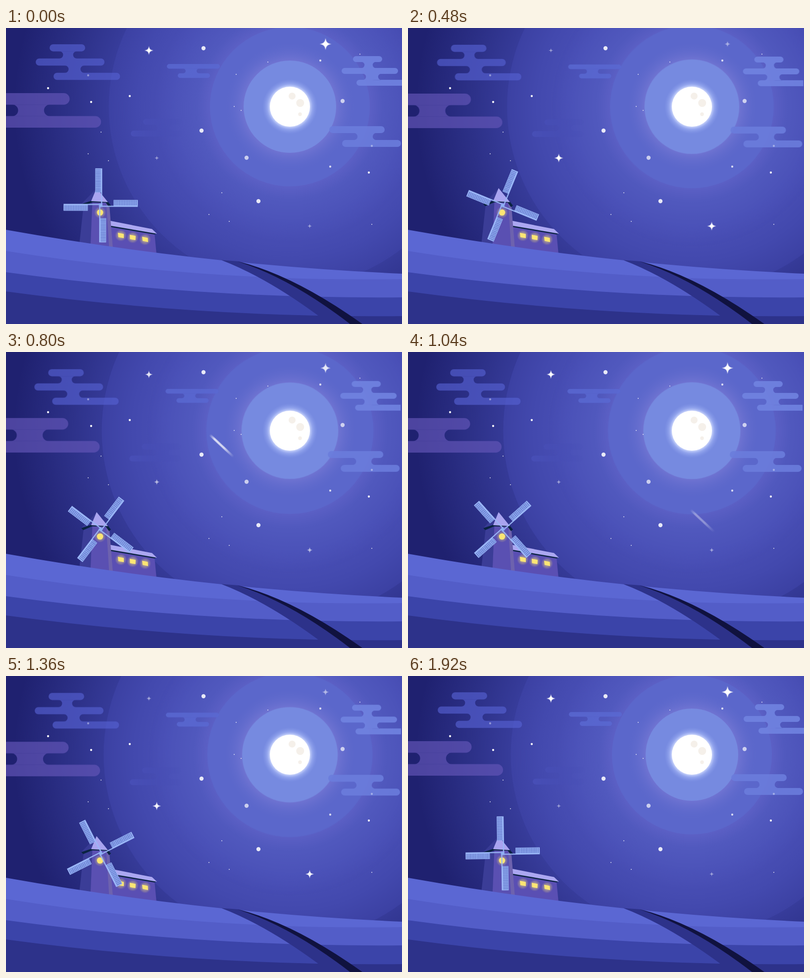
Animation of 800x600 px, one loop 1960 ms. Source, as an HTML page without scripts:

```html
<!DOCTYPE html>
<html lang="en">
<head>
<meta charset="utf-8">
<title>Windmill at night</title>
<style>
html, body { margin: 0; width: 100%; height: 100%; overflow: hidden; background: #1f2170; }
svg { display: block; width: 100%; height: 100%; }

.halo, .ring { transform-origin: 573.5px 159.5px; animation: grow 980ms cubic-bezier(.37, 0, .63, 1) infinite alternate; }
.halo { --s: 1.05; }
.ring { --s: 1.042; }
@keyframes grow { to { transform: scale(var(--s)); } }

.clouds { animation: drift 980ms cubic-bezier(.37, 0, .63, 1) infinite alternate; }
@keyframes drift { to { transform: translate(-3px, 1.9px); } }
.clouds path { stroke-linecap: round; }
.clouds .neck { stroke: none; }
.clouds .bar { fill: none; }

.spark { animation: twinkle 490ms cubic-bezier(.37, 0, .63, 1) infinite alternate; }
.late { animation-delay: -490ms; }
@keyframes twinkle { to { transform: scale(.5); opacity: .48; } }

.blades { animation: spin 1960ms linear infinite; }
@keyframes spin { to { transform: rotate(90.9deg); } }

.meteor { animation: fly 1960ms linear infinite; }
@keyframes fly {
  0%, 29.6% { transform: translate(-145px, -139px); opacity: 0; }
  36.7% { opacity: .85; }
  40.82% { transform: translate(0, 0); opacity: .85; }
  53.06% { transform: translate(159px, 152px); opacity: .4; }
  59.2%, 100% { transform: translate(238px, 228px); opacity: 0; }
}
</style>
</head>
<body>
<svg viewBox="0 0 800 600" preserveAspectRatio="none">
  <defs>
    <radialGradient id="sky" gradientUnits="userSpaceOnUse" cx="573.5" cy="159.5" r="600">
      <stop offset=".6" stop-color="#383d9c"/>
      <stop offset=".75" stop-color="#2c3087"/>
      <stop offset=".93" stop-color="#1f2170"/>
    </radialGradient>
    <radialGradient id="outer">
      <stop offset=".68" stop-color="#494fb5"/>
      <stop offset=".84" stop-color="#4349ae"/>
      <stop offset="1" stop-color="#3c41a3"/>
    </radialGradient>
    <radialGradient id="glow">
      <stop offset=".58" stop-color="#5c60c5"/>
      <stop offset=".68" stop-color="#5159be"/>
      <stop offset=".84" stop-color="#4c53b9"/>
      <stop offset="1" stop-color="#494fb5" stop-opacity="0"/>
    </radialGradient>
    <radialGradient id="haze">
      <stop offset=".7" stop-color="#7074d2"/>
      <stop offset="1" stop-color="#5c68cb" stop-opacity="0"/>
    </radialGradient>
    <radialGradient id="shine">
      <stop offset=".7" stop-color="#dfe6ff" stop-opacity=".95"/>
      <stop offset=".82" stop-color="#b0c0fa" stop-opacity=".5"/>
      <stop offset="1" stop-color="#8ea0ee" stop-opacity="0"/>
    </radialGradient>
    <radialGradient id="lamp">
      <stop offset=".35" stop-color="#fbe574" stop-opacity=".5"/>
      <stop offset="1" stop-color="#fbe574" stop-opacity="0"/>
    </radialGradient>
    <linearGradient id="fade" gradientUnits="userSpaceOnUse" x1="252" x2="360" y1="0" y2="0">
      <stop offset="0" stop-color="#484fb6"/>
      <stop offset="1" stop-color="#484fb6" stop-opacity="0"/>
    </linearGradient>
    <linearGradient id="tail">
      <stop offset="0" stop-color="#fff" stop-opacity="0"/>
      <stop offset=".2" stop-color="#fff" stop-opacity=".9"/>
      <stop offset=".6" stop-color="#fff" stop-opacity=".85"/>
      <stop offset="1" stop-color="#fff" stop-opacity="0"/>
    </linearGradient>
    <path id="star" fill="#fff" d="M0-1C.12-.3 .3-.12 1 0C.3 .12 .12 .3 0 1C-.12 .3-.3 .12-1 0C-.3-.12-.12-.3 0-1Z"/>
    <g id="arm">
      <path fill="#9ab6f7" d="M-11-75H2.5V-26H-11Z"/>
      <path d="M-9-73V-27M-6.4-73V-27M-3.8-73V-27M-1.2-73V-27" stroke="#4a5cb8" stroke-width="1.5" stroke-dasharray="2.1 1.3"/>
      <path fill="#9ab6f7" d="M.8-75H3V0H.8Z"/>
    </g>
  </defs>

  <rect width="800" height="600" fill="url(#sky)"/>
  <circle class="ring" cx="573.5" cy="159.5" r="366" fill="url(#outer)"/>
  <g class="halo">
    <circle cx="573.5" cy="159.5" r="276" fill="url(#glow)"/>
    <circle cx="573.5" cy="159.5" r="161.5" fill="#5b67cb"/>
    <circle cx="573.5" cy="159.5" r="132" fill="url(#haze)"/>
    <circle cx="573.5" cy="159.5" r="93.5" fill="#768ae0"/>
  </g>

  <g class="clouds">
    <g fill="#5660d0" stroke="#5660d0" stroke-width="14.5" opacity=".66">
      <path class="bar" d="M95.3 40.2H152.7M67.3 69H191.7M103.3 98H223.2"/>
      <path class="neck" d="M108 47.2a7.25 7.25 0 0 1 0 14.8H143a7.25 7.25 0 0 1 0-14.8ZM119 76a7.25 7.25 0 0 1 0 15H158a7.25 7.25 0 0 1 0-15Z"/>
    </g>
    <g fill="#6154b6" stroke="#6154b6" stroke-width="23.5" opacity=".7">
      <path class="bar" d="M-40 143.8H116.8M-40 190.3H180.3"/>
      <path class="neck" d="M12.8 155.3a11.7 11.7 0 0 1 0 23.4H88.5a11.7 11.7 0 0 1 0-23.4Z"/>
    </g>
    <g fill="#5b69d2" stroke="#5b69d2" stroke-width="9.4" opacity=".8">
      <path class="bar" d="M329.7 77.7H427.5M351.7 96.5H407.5"/>
      <path class="neck" d="M358 82.2a4.8 4.8 0 0 1 0 9.8H390a4.8 4.8 0 0 1 0-9.8Z"/>
    </g>
    <g fill="url(#fade)" stroke="url(#fade)" stroke-width="12">
      <path class="bar" d="M283 190H350M258 214H350"/>
      <path class="neck" d="M300 196a6 6 0 0 1 0 12H336a6 6 0 0 1 0-12Z"/>
    </g>
    <g fill="#7083e0" stroke="#7083e0" stroke-width="12" opacity=".9">
      <path class="bar" d="M707 63H754M684 87H786M714 111H740"/>
      <path class="neck" d="M718 68.8a6 6 0 0 1 0 12.4H747a6 6 0 0 1 0-12.4ZM721 92.8a6 6 0 0 1 0 12.4H758a6 6 0 0 1 0-12.4ZM730 105H800V117H730Z"/>
    </g>
    <g fill="#6b7ddc" stroke="#6b7ddc" stroke-width="14" opacity=".9">
      <path class="bar" d="M660 206H758M686 234H791"/>
      <path class="neck" d="M703 212.8a7.1 7.1 0 0 1 0 14.4H748a7.1 7.1 0 0 1 0-14.4Z"/>
    </g>
  </g>

  <circle cx="573.5" cy="159.5" r="56" fill="url(#shine)"/>
  <circle cx="573.5" cy="159.5" r="40.5" fill="#fff"/>
  <g fill="#f5f0ea">
    <circle cx="578" cy="138" r="7"/><circle cx="594.3" cy="152" r="8"/><circle cx="594" cy="174.7" r="3.7"/>
  </g>

  <g fill="none" stroke="#fff" stroke-linecap="round">
    <path stroke-width="8.4" opacity=".87" d="M399 41h0M395 208h0M510 351h0"/>
    <path stroke-width="8.4" opacity=".68" d="M486 263h0M680 148h0"/>
    <path stroke-width="4.3" d="M85 122h0M172 150h0M250 138h0M733 293h0" opacity=".95"/>
    <path stroke-width="4.3" d="M635 66h0M655 281h0" opacity=".75"/>
    <path stroke-width="4.3" d="M166 96h0M739 239h0" opacity=".38"/>
    <path stroke-width="2.1" opacity=".75" d="M192 211h0M166 255h0M207 269h0M529 69h0M465 94h0M461 159h0M475 167h0M715 53h0M436 334h0M410 378h0M451 392h0M739 398h0"/>
  </g>

  <g transform="translate(288.7 45.5)"><g class="spark"><use href="#star" transform="scale(9)"/></g></g>
  <g transform="translate(645.5 32.5)"><g class="spark"><use href="#star" transform="scale(12)"/></g></g>
  <g transform="translate(304.6 263.5)"><g class="spark late"><use href="#star" transform="scale(9)"/></g></g>
  <g transform="translate(613.5 401.5)"><g class="spark late"><use href="#star" transform="scale(9)"/></g></g>

  <g class="meteor">
    <rect x="-33" y="-2.3" width="66" height="4.6" rx="2.3" fill="url(#tail)" transform="translate(435 189.5) rotate(43.2)"/>
  </g>

  <!-- mill and barn -->
  <path fill="#5a4fb3" d="M208 400L300 416L304 458L212 450Z"/>
  <path fill="#0a2342" d="M209 399L304 416.5L300 418.5L209 403Z"/>
  <path fill="#aba7f1" d="M209 390.5L295 407.5L305 417L209 400.5Z"/>
  <path fill="#3b3d97" d="M157 357L175 352L171 440H148Z"/>
  <path fill="#5a50b2" d="M174.500 352H204L210 446H170.500Z"/>
  <path fill="#6d62ae" d="M202.500 353L209 361L216 448H208.500Z"/>
  <path fill="#383b95" d="M183 325L173 351L152 357Z"/>
  <path fill="#0a2342" d="M152 357L173 350L205 351L212 360L208 363L201.500 354L174 353.500L156 361Z"/>
  <path fill="#a9a4ef" d="M183 324.500L172 351L206 353Z"/>
  <g fill="url(#lamp)">
    <circle cx="190" cy="374" r="12"/><circle cx="232" cy="420.500" r="12"/><circle cx="256" cy="424.500" r="12"/><circle cx="281" cy="428.500" r="12"/>
  </g>
  <g fill="#fbe574">
    <circle cx="190" cy="374" r="6.300"/>
    <path d="M226 415l12 2.500v8.500l-11-2zM250 419l12 2.500l-.5 8.500l-11-2zM275 423l11.500 2.500l.5 8.500l-11-2.500z"/>
  </g>

  <!-- hills and road -->
  <path fill="#5b67d3" d="M0 409Q400 480.500 800 498V600H0Z"/>
  <path fill="#535dc8" d="M0 452Q400 515.500 800 509V600H0Z"/>
  <path fill="#3b44a9" d="M0 495Q400 549.500 800 546V600H0Z"/>
  <path fill="#2d328a" d="M0 534Q400 588 800 584V600H0Z"/>
  <path fill="#2d328a" d="M435 470.500L470 473Q580 502 710 600H652L632 584Q525 505 435 470.500Z"/>
  <path fill="#10123f" d="M468 473.200Q580 500 720 600H695Q575 507 468 473.200Z"/>

  <g transform="translate(191.300 359.500)">
    <g class="blades">
      <use href="#arm"/>
      <use href="#arm" transform="rotate(90)"/>
      <use href="#arm" transform="rotate(180)"/>
      <use href="#arm" transform="rotate(270)"/>
      <rect x="-3.500" y="-3.500" width="7" height="7" fill="#8fb0f5"/>
    </g>
  </g>
</svg>
</body>
</html>
```
